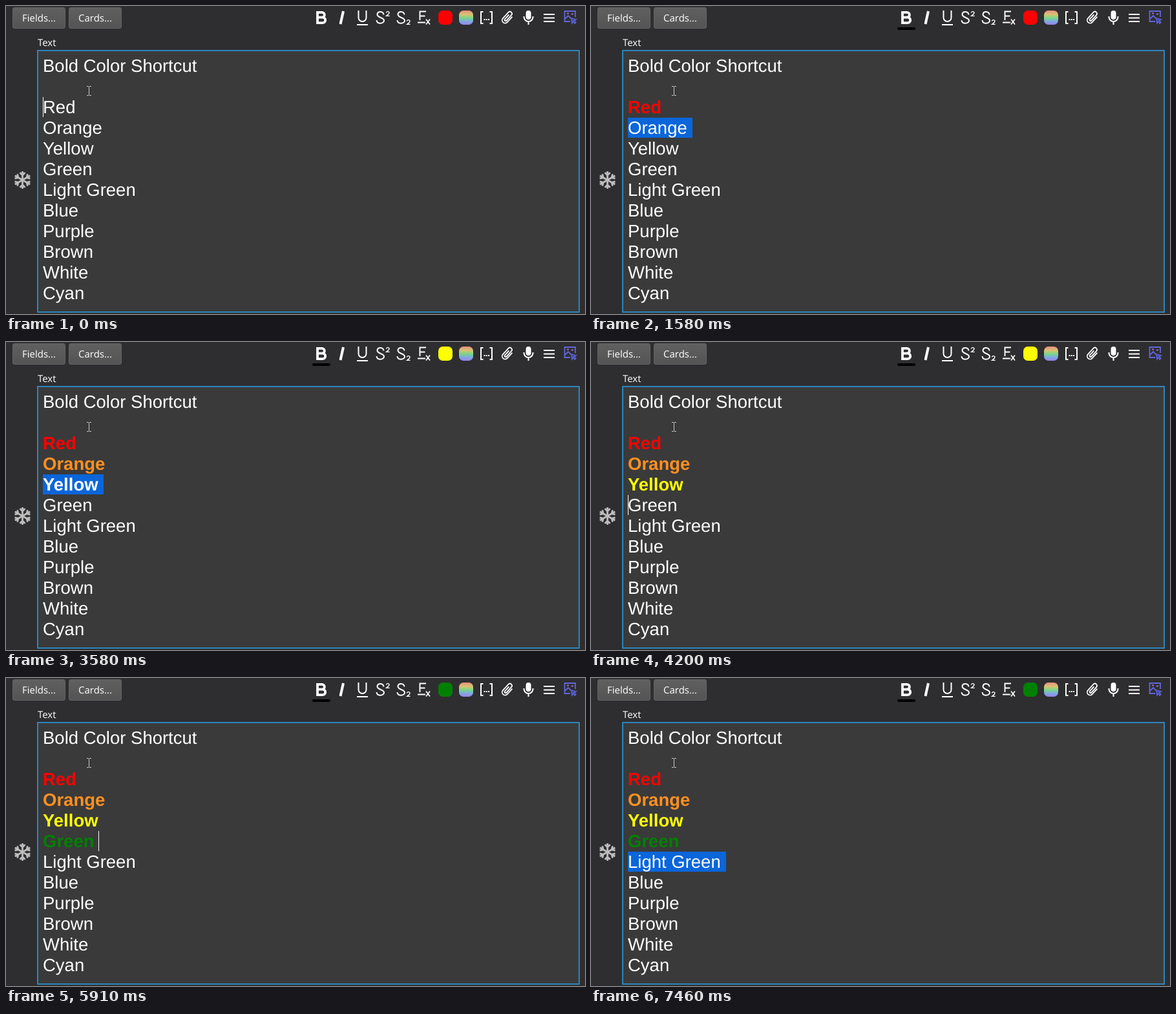
Write an HTML page that moves like this. It is 896 px wide and 477 px high and loops after 8 s.

```html
<!DOCTYPE html>
<html lang="en">
<head>
<meta charset="utf-8">
<title>Bold color shortcut</title>
<style>
  html, body { margin: 0; width: 100%; height: 100%; overflow: hidden; background: #2e2e30; }
  body { position: relative; color: #fff; text-rendering: geometricPrecision; }
  svg, .button, .label, .field, .line, #caret { position: absolute; box-sizing: border-box; }
  svg { left: 0; top: 0; }
  .button, .label { font: 15px/20px "Open Sans", sans-serif; }
  .button {
    top: 2px; width: 82px; height: 33px; line-height: 32px; text-align: center;
    border: 1px solid #646464; border-radius: 3px;
    background: linear-gradient(#606060, #545454);
  }
  .label { left: 49px; top: 47px; }
  .field { left: 48px; top: 68px; width: 840px; height: 407px; border: 2px solid #2d86be; background: #3a3a3a; }
  .line { left: 57px; font: 27.5px/31px "Liberation Sans", Arial, sans-serif; white-space: pre; }
  .selected { color: #fff; background: #0a66da; padding-right: .4px; margin-right: -.4px; }
  #caret { width: 1px; height: 31px; background: #fff; }
</style>
</head>
<body>
<div class="button" style="left:10px">Fields...</div>
<div class="button" style="left:97px">Cards...</div>
<div class="label">Text</div>
<div class="field"></div>
<div class="line" style="top:77px">Bold Color Shortcut</div>
<div id="words"></div>
<div id="caret"></div>

<svg width="896" height="477" fill="none" stroke="#fff" stroke-width="2">
  <defs>
    <linearGradient id="spectrum" x2="0" y2="1">
      <stop stop-color="#ec8d7c"/>
      <stop offset=".28" stop-color="#d8c273"/>
      <stop offset=".52" stop-color="#7bd688"/>
      <stop offset=".76" stop-color="#7fa9e2"/>
      <stop offset="1" stop-color="#9a80ee"/>
    </linearGradient>
    <path id="two" d="M.5 2.5Q.7.6 2.8.6T5 2.6Q5 4 .7 7.4H5.6" stroke-width="1.4"/>
  </defs>

  <!-- Text formatting -->
  <path d="M482 9.9h7a3.9 3.9 0 0 1 0 7.8h-7zm0 7.8h8a4.2 4.2 0 0 1 0 8.4h-8z" stroke-width="3.8"/>
  <rect id="boldBar" x="474" y="33" width="28" height="4" rx="2" fill="#000" stroke="none"/>
  <path d="M522 8l-4.5 20" stroke-width="4"/>
  <path d="M545.5 7v11a6 6 0 0 0 12 0V7M543 29h17"/>
  <path id="ess" d="M584.5 13.5C584 7.5 574.5 7.5 574.5 13S585 17.500 585 22.500 574 29 573.500 22"/>
  <use href="#ess" x="32"/>
  <use href="#two" x="588" y="8"/>
  <use href="#two" x="620" y="21"/>
  <path d="M650 8.500h-9.500V22m0-6.500h8M637 25.500h12" stroke-width="1.9"/>
  <path d="M650 20.500l6 8m0-8l-6 8" stroke-width="1.7"/>

  <!-- Colors -->
  <rect id="swatch" x="669" y="7" width="22" height="22" rx="7" stroke="none"/>
  <rect x="701" y="7" width="22" height="22" rx="7" fill="url(#spectrum)" stroke="none"/>

  <!-- Insert tools -->
  <path d="M738.500 9H735v18h3.500M748.500 9h3.500v18h-3.500"/>
  <path d="M739.500 21h8.500" stroke-dasharray="2 1.250"/>
  <path transform="translate(776 18) rotate(42)"
        d="M4.500-6V5.500a4.500 4.500 0 0 1-9 0V-7a3.200 3.200 0 0 1 6.400 0V4.500a1.600 1.600 0 0 1-3.200 0V-5" stroke-width="1.800"/>
  <rect x="804.500" y="7" width="8" height="14" rx="4" fill="#fff" stroke="none"/>
  <path d="M801.500 16v1a7 7 0 0 0 14 0v-1M808.500 24v5"/>
  <path d="M832 13h17M832 18.500h17M832 24h17"/>
  <g stroke="#6068dc" stroke-width="1.800">
    <path d="M873 24h-8.500V8H881v9M865 20l5-5 4 4"/>
    <path d="M868 11.500h3M875 12.500h3" stroke="#9b6ad8"/>
    <path d="M874.500 18.500l8 2.500-3 1.500 2.500 3-1.800 1.800-2.700-3-1.500 2.700z" fill="#434aa8" stroke-width="1.300"/>
  </g>

  <!-- Snowflake -->
  <defs>
    <path id="arm" d="M0 0V-13.500M-4-11.500L0-7.500 4-11.500"/>
  </defs>
  <g id="snowflake" transform="translate(25.500 269.500)" stroke="#bdbdbd" stroke-width="2.800"></g>

  <!-- Mouse pointer -->
  <path d="M125 124.500h3m1 0h3M125 138.500h3m1 0h3M128.500 125v13" stroke="#c8c8c8" stroke-width="1"/>
</svg>

<script>
const DURATION = 8000;
const words = ["Red", "Orange", "Yellow", "Green", "Light Green", "Blue", "Purple", "Brown", "White", "Cyan"];
const colors = ["#ff0000", "#ff9020", "#ffff00", "#008000"];
const HOME = 57, ALL = 99;
const lineTop = line => 141 + line * 32;

// [start time, styled lines, active line, selected characters, caret x]
const steps = [
  [0, 0, 0, 0, HOME], [310, 0, 0, ALL], [930, 1, 0, ALL],
  [1250, 1, 1, 0, HOME], [1580, 1, 1, ALL], [2180, 2, 1, ALL],
  [2650, 2, 2, 0, HOME], [2960, 2, 2, ALL], [3580, 3, 2, ALL],
  [4200, 3, 3, 0, HOME], [4520, 3, 3, ALL], [5290, 4, 3, ALL],
  [5910, 4, 3, 0, 143], [6370, 4, 4, 0, 144], [6830, 4, 4, 0, 123],
  [6990, 4, 4, 0, HOME], [7300, 4, 4, 6], [7460, 4, 4, ALL]
];

const byId = id => document.getElementById(id);
const caret = byId("caret");

const lines = words.map((word, i) => {
  const line = document.createElement("div");
  const selected = document.createElement("span");
  const rest = document.createElement("span");
  line.className = "line";
  line.style.top = lineTop(i) + "px";
  selected.className = "selected";
  line.append(selected, rest);
  byId("words").append(line);
  return { line, selected, rest, text: word + " " };
});

byId("snowflake").innerHTML = [0, 60, 120, 180, 240, 300]
  .map(angle => `<use href="#arm" transform="rotate(${angle})"/>`).join("");

function show([, styled, active, count, caretX]) {
  lines.forEach(({ line, selected, rest, text }, i) => {
    const end = i === active ? count : 0;
    selected.textContent = text.slice(0, end);
    selected.hidden = !end;
    rest.textContent = text.slice(end);
    line.style.fontWeight = i < styled ? "bold" : "normal";
    line.style.color = i < styled ? colors[i] : "#fff";
  });
  caret.hidden = count > 0;
  caret.style.left = caretX + "px";
  caret.style.top = lineTop(active) + "px";
  byId("boldBar").style.display = styled ? "" : "none";
  byId("swatch").setAttribute("fill", colors[Math.max(styled - 1, 0)]);
}

let current;
function tick() {
  const time = performance.now() % DURATION;
  const step = steps.findLast(([start]) => start <= time);
  if (step !== current) show(current = step);
  requestAnimationFrame(tick);
}
tick();
</script>
</body>
</html>
```
